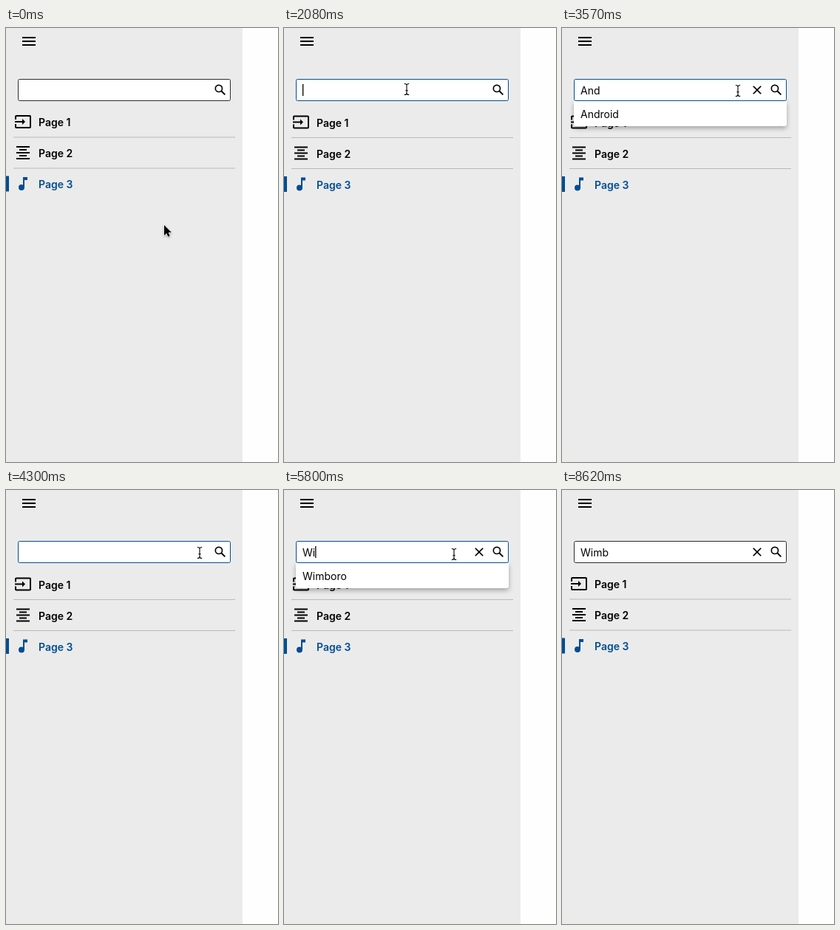
Animation, 368 px wide and 588 px high, one loop 9070 ms. Source, as an HTML page:

```html
<!DOCTYPE html>
<html lang="en">
<head>
<meta charset="utf-8">
<title>Sidebar search</title>
<style>
  html, body { margin: 0; width: 100%; height: 100%; overflow: hidden; background: #fefefe; }
  svg { display: block; }
  text { font: 400 14px Inter, sans-serif; fill: #000; }
  #nav text { font-weight: 600; }
  #nav .active, #nav .active text { fill: #004d91; }
  #divider { fill: #b9b9b9; }
  #field { fill: #fff; stroke: #2b2b2b; }
  .focused #field { stroke: #004d91; }
  #nav { transform: translateY(-.5px); }
  .focused #nav { transform: none; }
  #panel { fill: #fff; filter: drop-shadow(0 3px 3px rgba(0, 0, 0, .3)); }
  .pointer { visibility: hidden; }
  .arrow #arrow, .beam #beam, .hand #hand { visibility: visible; }
</style>
</head>
<body>
<svg id="stage" width="368" height="588" viewBox="0 0 368 588">
  <rect width="320" height="588" fill="#ebebeb"/>
  <path d="M22 12h18v2h-18zm0 5h18v2h-18zm0 5h18v2h-18z"/>

  <g id="nav">
    <rect id="hover" width="320" height="41" fill="#ccc8c5"/>
    <path id="divider" d="M10 148h300v1h-300zm0 42h300v1h-300z"/>
    <path transform="translate(11 115.5)" d="M21 3H3c-1.1 0-2 .9-2 2v4h2V5h18v14H3v-4H1v4c0 1.1.9 2 2 2h18c1.1 0 2-.9 2-2V5c0-1.1-.9-2-2-2zM11 16l4-4-4-4v3H1v2h10z"/>
    <text x="44" y="133.5">Page 1</text>
    <path transform="translate(11 157.5)" d="M7 15v2h10v-2zm-4 6h18v-2H3zm0-8h18v-2H3zm4-6v2h10V7zM3 3v2h18V3z"/>
    <text x="44" y="175.5">Page 2</text>
    <g class="active">
      <rect y="201" width="4" height="21"/>
      <path transform="translate(11 199.5)" d="M12 3v10.55c-.59-.34-1.27-.55-2-.55a4 4 0 1 0 4 4V7h4V3z"/>
      <text x="44" y="217.5">Page 3</text>
    </g>
  </g>

  <g id="menu">
    <path id="panel"/>
    <text x="25" y="122"></text>
    <text x="25" y="154"></text>
  </g>

  <rect id="field" x="16.5" y="69.5" width="287" height="29" rx="2"/>
  <text id="query" x="25" y="90"></text>
  <rect id="caret" y="76" width="1.3" height="16"/>
  <path id="clear" transform="translate(254 74) scale(.8333)" d="M19 6.4 17.6 5 12 10.6 6.4 5 5 6.4l5.6 5.6L5 17.6 6.4 19l5.6-5.6 5.6 5.6 1.4-1.4-5.6-5.6z"/>
  <g transform="translate(280 74) scale(.8333)" fill="none" stroke="#000" stroke-width="2">
    <circle cx="9.5" cy="9.5" r="5.5"/>
    <path d="m13.6 13.6 6 6" stroke-width="2.4"/>
  </g>

  <g id="cursor">
    <path id="arrow" class="pointer" d="M0 0v14l3.2-3 2.1 4.8 2.4-1-2.1-4.7h4.3z" stroke="#fff" stroke-width="1.2" paint-order="stroke" style="filter: drop-shadow(0 1px 1px rgba(0, 0, 0, .35))"/>
    <path id="beam" class="pointer" d="M-3.2-7.5q3.2 0 3.2 2.3v10.4q0 2.3-3.2 2.3M3.2-7.5q-3.2 0-3.2 2.3m0 10.4q0 2.3 3.2 2.3M-1.7 1.8h3.4" fill="none" stroke="#000" stroke-width="1.1"/>
    <path id="hand" class="pointer" d="M-1.7 1.5Q0-.8 1.7 1.5l1 4.6q1.4-1.2 2.6.2 1.4-.8 2.5.7 2.1-.3 2.4 2v3.8l-1.6 4.2H.8l-4.4-5.4q-2-2.6 0-3l3 1.4zM3 11.4v3M5.2 11.4v3M7.4 11.4v3" fill="#fff" stroke="#000" stroke-linejoin="round" style="filter: drop-shadow(0 1px 1px rgba(0, 0, 0, .3))"/>
  </g>
</svg>

<script>
const LOOP = 9070, TICKS = 61;
const OPTIONS = ['Android', 'Ombaq', 'Wimboro'];

// Every track lists [tick, value...]; an entry holds until the next one.
const typing = [[0, ''], [17, 'A'], [19, 'An'], [20, 'And'], [27, ''],
  [36, 'W'], [39, 'Wi'], [42, 'Wim'], [43, 'Wimb']];
const focus = [[0, false], [13, true], [30, false], [34, true], [52, false]];
const blink = [[0, false], [13, true], [15, false], [17, true], [22, false],
  [25, true], [27, false], [34, true], [46, false], [50, true]];
const pointer = [
  [0, 'arrow', 214, 267], [2, 'arrow', 216, 262], [3, 'arrow', 200, 240],
  [4, 'arrow', 172, 62], [5, 'arrow', 166, 30], [6, 'arrow', 162, 13],
  [7, 'arrow', 162, 28], [8, 'arrow', 164, 50], [9, 'beam', 165, 78],
  [11, 'beam', 166, 83],
  [22, 'beam', 176, 83], [23, 'beam', 205, 84], [24, 'beam', 238, 85],
  [25, 'hand', 260, 79], [26, 'hand', 262, 80], [27, 'beam', 262, 85],
  [30, 'beam', 256, 85], [31, 'beam', 244, 86], [32, 'beam', 234, 87],
  [33, 'beam', 230, 87],
  [44, 'beam', 232, 90], [45, 'hand', 238, 112], [46, 'hand', 245, 130],
  [47, 'hand', 252, 168], [48, 'hand', 257, 202], [49, 'hand', 260, 218],
  [50, 'hand', 261, 226], [51, 'arrow', 264, 262], [52, 'arrow', 266, 288],
  [53, 'arrow', 272, 330], [54, 'arrow', 284, 375], [55, 'arrow', 292, 440],
  [56, 'arrow', 304, 510], [57, 'arrow', 336, 584], [58, 'none', 336, 584]
];

const $ = id => document.getElementById(id);
const at = (track, tick) => track.findLast(entry => entry[0] <= tick);
const show = (el, on) => el.style.display = on ? '' : 'none';
const labels = $('menu').querySelectorAll('text');

function render(tick) {
  const text = at(typing, tick)[1];
  const focused = at(focus, tick)[1];
  const [, kind, x, y] = at(pointer, tick);
  $('stage').setAttribute('class', `${kind} ${focused ? 'focused' : ''}`);
  $('cursor').setAttribute('transform', `translate(${x} ${y})`);

  $('query').textContent = text;
  show($('clear'), text);
  show($('caret'), focused && at(blink, tick)[1]);
  $('caret').setAttribute('x', 25 + (text ? $('query').getComputedTextLength() : 0));

  const matches = text && focused
    ? OPTIONS.filter(name => name.toLowerCase().includes(text.toLowerCase())) : [];
  const bottom = 101 + 32 * matches.length;
  show($('menu'), matches.length);
  $('panel').setAttribute('d', `M16 99H304V${bottom - 3}q0 3-3 3H19q-3 0-3-3z`);
  labels.forEach((label, i) => label.textContent = matches[i] || '');

  const row = Math.floor((y - 107) / 42);
  show($('hover'), kind === 'hand' && row >= 0 && row < 3 && y > bottom);
  $('hover').setAttribute('y', 107 + 42 * row);
}

let shown = -1;
function frame() {
  const tick = Math.floor((performance.now() % LOOP + 5) / LOOP * TICKS) % TICKS;
  if (tick !== shown) render(shown = tick);
  requestAnimationFrame(frame);
}
frame();
</script>
</body>
</html>
```
